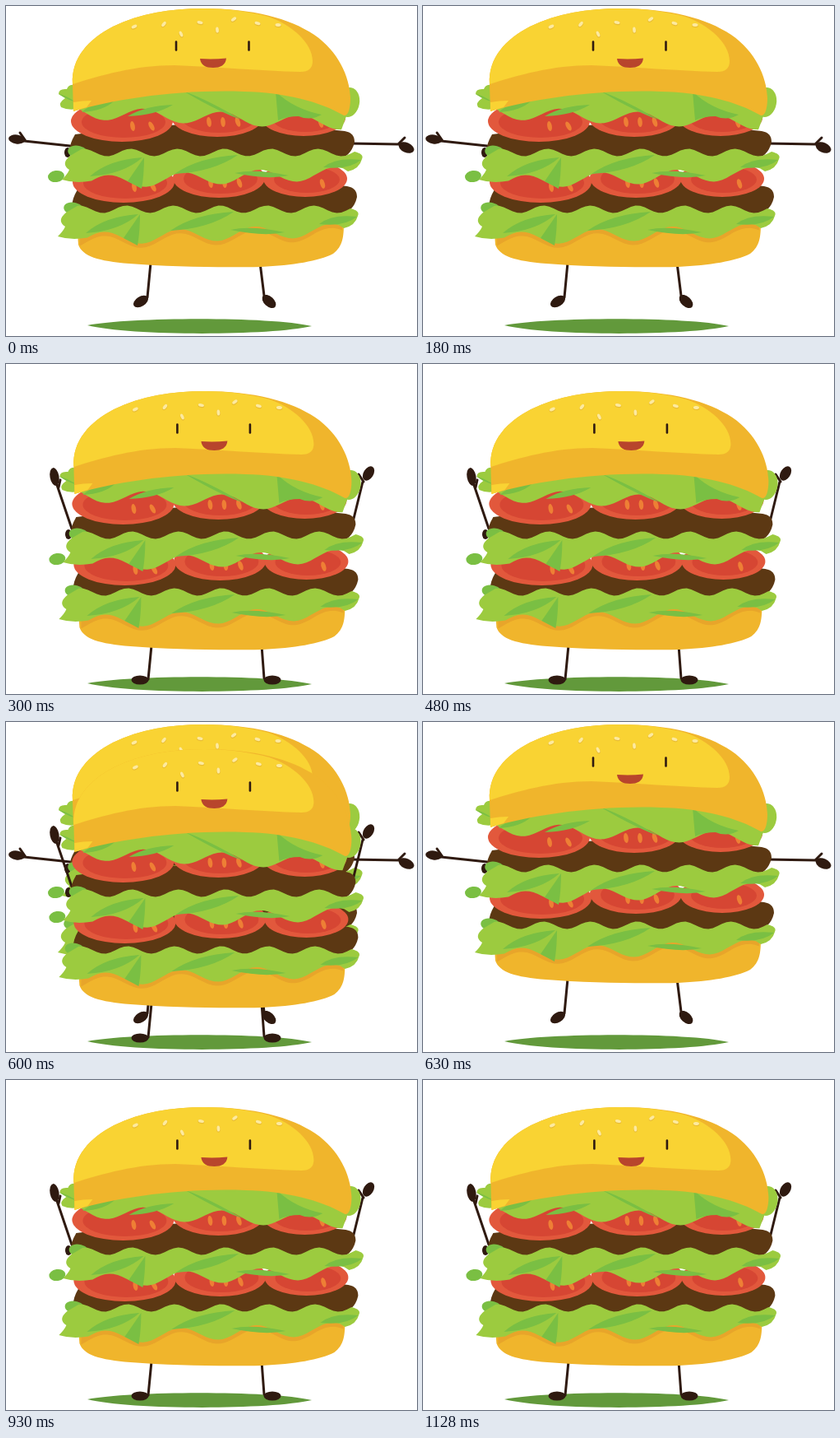
An HTML page for the animation above (1.26 s loop, 500x401 px).

```html
<!DOCTYPE html>
<html lang="en">
<head>
<meta charset="utf-8">
<title>Jumping burger</title>
<style>
  html, body { margin: 0; width: 100%; height: 100%; overflow: hidden; background: #fff; }
  svg { display: block; width: 100%; height: 100%; }
  .limb { fill: none; stroke: #2f1a10; stroke-width: 3; stroke-linecap: round; }
  .tip { fill: #2f1a10; }
</style>
</head>
<body>
<svg viewBox="0 0 500 401">
  <defs>
    <g id="body"></g>
  </defs>
  <path fill="#62993b" d="M99 388C150 378 320 377 372 389C320 401 150 401 99 388Z"/>

  <g id="jump">
    <g class="limb">
      <path d="M78 170L22 164M17 154L24 164M418 167L478 168M485 160L477 168"/>
      <path d="M176 312L172 354M309 312L314 352"/>
    </g>
    <g class="tip">
      <ellipse cx="13" cy="162" rx="10" ry="5.5" transform="rotate(8 13 162)"/>
      <ellipse cx="487" cy="172" rx="10" ry="6" transform="rotate(24 487 172)"/>
      <ellipse cx="75" cy="178" rx="4" ry="6"/>
      <ellipse cx="164" cy="359" rx="10" ry="6" transform="rotate(-32 164 359)"/>
      <ellipse cx="320" cy="359" rx="10" ry="6" transform="rotate(42 320 359)"/>
    </g>
    <use href="#body"/>
  </g>

  <g id="land">
    <g class="limb">
      <path d="M80 200L62 147M66 141L64 150M420 200L434 143M429 134L435 143"/>
      <path d="M177 342L173 383M311 342L314 382"/>
    </g>
    <g class="tip">
      <ellipse cx="59" cy="137" rx="5.5" ry="11" transform="rotate(-10 59 137)"/>
      <ellipse cx="441" cy="133" rx="6" ry="9.5" transform="rotate(32 441 133)"/>
      <ellipse cx="76" cy="207" rx="4" ry="6"/>
      <ellipse cx="163" cy="384" rx="10.5" ry="5.5"/>
      <ellipse cx="324" cy="384" rx="10.5" ry="5.5"/>
    </g>
    <use href="#body" x="1.4" y="30"/>
  </g>
</svg>

<script>
const BUN = '#f0b52c', GLOW = '#f9d333', CRUST = '#e8a52a';
const LEAF = '#9ccb3f', SHADE = '#7abf43';
const RIND = '#e2583c', PULP = '#d64633', PIP = '#ee7f35';
const MEAT = '#5c3813', INK = '#2f1a10';

const body = document.getElementById('body');
let layer = body;

function add(tag, attrs) {
  const el = document.createElementNS('http://www.w3.org/2000/svg', tag);
  for (const key in attrs) el.setAttribute(key, attrs[key]);
  layer.append(el);
  return el;
}

const path = (fill, d) => add('path', { fill, d });

function oval(fill, x, y, rx, ry, turn = 0) {
  add('ellipse', { fill, cx: x, cy: y, rx, ry, transform: `rotate(${turn} ${x} ${y})` });
}

// Draws a part inside a shifted group.
function at(dx, dy, draw) {
  layer = add('g', { transform: `translate(${dx} ${dy})` });
  draw();
  layer = body;
}

// Height of a wavy edge that hangs lowest at x = low.
const wave = (y, amp, low, period, slope = 0) =>
  x => y + slope * (x - 250) + amp * Math.cos((x - low) / period * 2 * Math.PI);

function edge(fn, from, to) {
  const n = 60;
  return Array.from({ length: n + 1 }, (_, i) => {
    const x = from + (to - from) * i / n;
    return `L${x.toFixed(1)} ${fn(x).toFixed(1)}`;
  }).join('');
}

// Thin curved fold between two points.
function fold(x0, y0, x1, y1, bulge) {
  const x = (x0 + x1) / 2, y = (y0 + y1) / 2;
  path(SHADE, `M${x0} ${y0}Q${x - bulge} ${y - bulge} ${x1} ${y1}Q${x + bulge} ${y + bulge} ${x0} ${y0}Z`);
}

const leafTop = wave(178, 4.5, 180, 57);
const leafHem = wave(209, 8, 170, 92, -0.035);

function leaf() {
  oval(SHADE, 88, 178, 13, 8, 15);
  path(LEAF, 'M78 182' + edge(leafTop, 92, 424) + 'Q436 180 433 186Q430 198 416 201'
    + edge(leafHem, 410, 104) + 'Q84 216 68 211Q75 204 77 199Q66 192 78 182Z');
  fold(102, 207, 166, 184, 9);
  path(SHADE, 'M168 184Q168 205 165 222L148 213Z');
  fold(205, 204, 282, 181, 9);
  fold(278, 203, 344, 206, 7);
  fold(386, 196, 432, 187, 8);
}

function patty() {
  path(MEAT, 'M84 156Q250 132 412 152Q424 154 424 165Q420 184 400 188H86Q70 180 84 156Z');
}

function slice(x, y, rx, ry, pips) {
  oval(RIND, x, y, rx, ry);
  oval(PULP, x + 2, y + 1, rx - 11, ry - 6);
  for (const dx of pips) oval(PIP, x + dx, y + 6, 2.8, 6, -Math.abs(dx) * 0.8);
}

function tomatoes() {
  slice(257, 135, 56, 24, [-10, 7, 25]);
  slice(362, 136, 51, 22, [21]);
  slice(141, 140, 62, 25, [13, 36]);
}

// Lower bun, with the crust shaded along the lettuce hem
path(BUN, 'M86 262L88 290C93 304 112 310 150 313C200 317 260 318 310 317C350 315 380 310 398 301C410 292 411 280 411 262Z');
at(-5, 74, () => path(CRUST, 'M95 190' + edge(leafHem, 95, 414) + 'V190Z'));

at(3, 67, patty);
at(-5, 69, leaf);
at(2, 74, tomatoes);

oval(SHADE, 61, 207, 10, 7, -8);
patty();
leaf();

// Side leaves and the frill under the upper bun
path(LEAF, 'M84 96Q76 95 74 101Q64 100 64 107L72 112Q63 118 67 123Q78 128 90 124Z');
fold(64, 107, 84, 116, 4);
oval(LEAF, 417, 117, 13, 18, 10);
tomatoes();
path(LEAF, 'M90 126L100 110L250 92L400 108L414 134' + edge(wave(136, 8, 310, 95, 0.04), 408, 104) + 'Z');
fold(92, 129, 132, 115, 6);
fold(148, 134, 203, 120, 6);
fold(217, 104, 286, 138, -8);
path(SHADE, 'M328 104Q350 125 384 132Q370 140 356 134Q342 134 331 139Z');

// Upper bun
path(BUN, 'M82 128L81 95C79 63 101 40 130 25C163 9 200 3 240 3C300 3 345 15 375 35C404 55 418 85 419 112C419 125 416 134 411 133C382 116 338 105 290 104C212 101 132 113 82 128Z');
path(GLOW, 'M81 95C79 63 101 40 130 25C163 9 200 3 240 3C270 3 297 7 319 13C348 23 373 45 373 67Q373 80 358 80C310 79 262 74 205 72C157 72 116 84 81 95Z');
path(GLOW, 'M82 117Q92 115 104 115L98 123L82 128Z');

const seeds = [[156, 25, -25], [192, 22, -50], [213, 34, 65], [236, 20, 12],
  [257, 29, 85], [277, 16, -35], [306, 21, 18], [331, 23, 5]];
for (const [x, y, turn] of seeds) {
  oval('#e9bd35', x, y + .8, 4, 2.3, turn);
  oval('#fdea9f', x, y, 3.6, 1.9, turn);
}

// Face
for (const x of [207, 295.5])
  add('path', { d: `M${x} 43.5V53.5`, stroke: INK, 'stroke-width': 2.6, 'stroke-linecap': 'round' });
path('#b8452c', 'M236 64Q252 65 268 63.5C267 72 261 75 252 75C243 75 237 72 236 64Z');

// Pose visibility: [ms, shown]; both poses overlap briefly from 600 to 630.
const LOOP = 1260;
const steps = {
  jump: [[0, 1], [300, 0], [600, 1], [930, 0], [LOOP, 0]],
  land: [[0, 0], [300, 1], [630, 0], [930, 1], [LOOP, 1]]
};
for (const id in steps) {
  const frames = steps[id].map(([ms, opacity]) => ({ offset: ms / LOOP, opacity, easing: 'step-end' }));
  const anim = document.getElementById(id).animate(frames, { duration: LOOP, iterations: Infinity });
  anim.startTime = document.timeline.currentTime;
}
</script>
</body>
</html>
```
